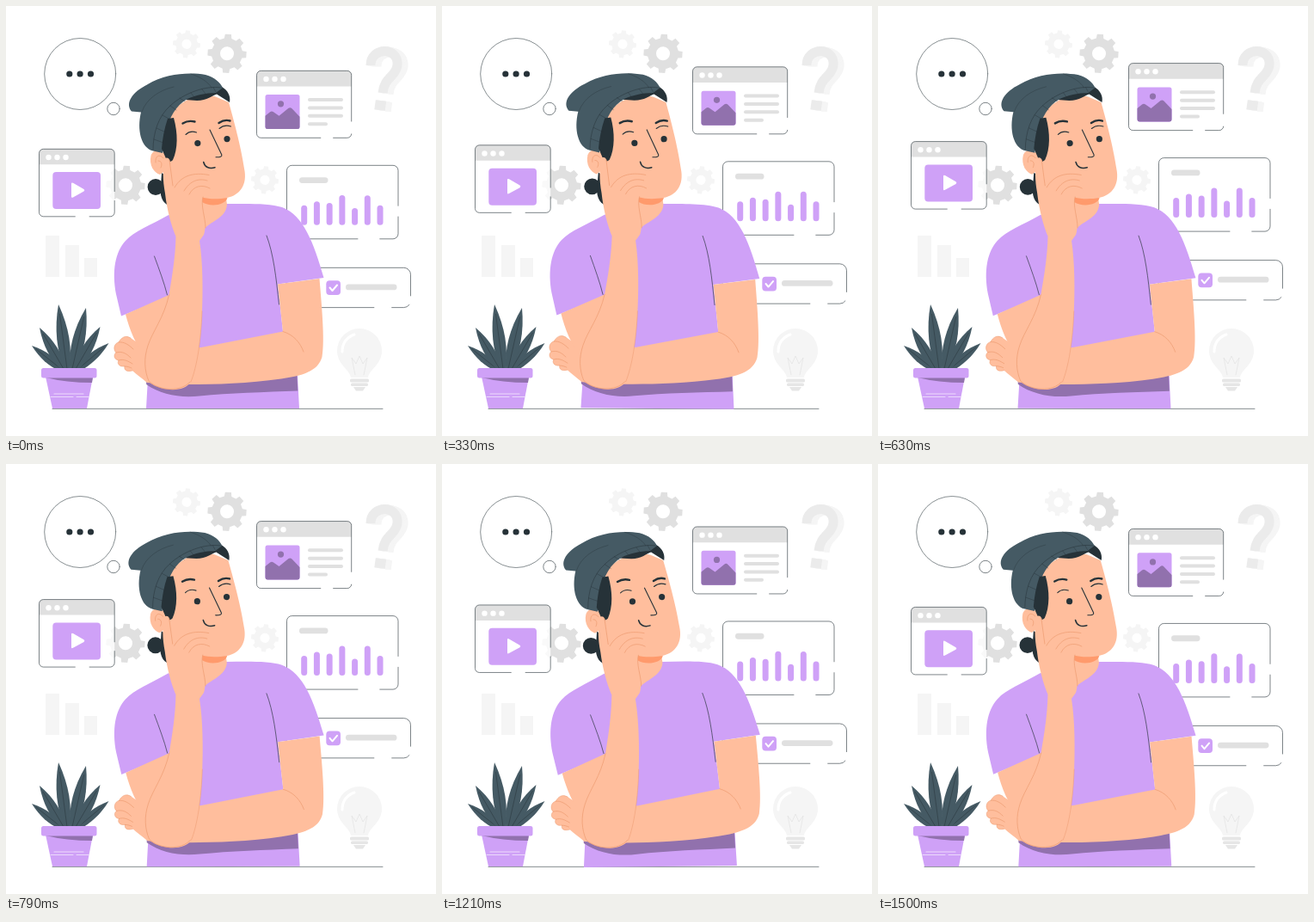
Recreate the animation shown at these times as an HTML page with a canvas. Size 500 by 500 pixels, loop 1.54 s.

```html
<!DOCTYPE html>
<html lang="en">
<head>
<meta charset="utf-8">
<title>Thinking</title>
<style>
html, body { margin: 0; width: 100%; height: 100%; overflow: hidden; background: #fff; }
canvas { display: block; width: 500px; height: 500px; }
</style>
</head>
<body>
<canvas id="stage" width="500" height="500"></canvas>
<script>
const ctx = document.getElementById('stage').getContext('2d');
const LOOP = 1540, TAU = Math.PI * 2;
const PURPLE = '#cfa1f7', SHADE = '#9171ad', INK = '#263238', HAT = '#455a64';
const SKIN = '#ffbe9d', CREASE = '#eb996e', GREY = '#e0e0e0', PALE = '#f5f5f5';

function fill(d, color) {
  ctx.fillStyle = color;
  ctx.fill(new Path2D(d));
}
function line(d, color, width = 0.65) {
  ctx.strokeStyle = color;
  ctx.lineWidth = width;
  ctx.stroke(new Path2D(d));
}
function dot(x, y, r, color) {
  ctx.fillStyle = color;
  ctx.beginPath();
  ctx.arc(x, y, r, 0, TAU);
  ctx.fill();
}
function ring(x, y, r, color, width) {
  ctx.strokeStyle = color;
  ctx.lineWidth = width;
  ctx.beginPath();
  ctx.arc(x, y, r, 0, TAU);
  ctx.stroke();
}
function box(x, y, w, h, r, color) {
  ctx.fillStyle = color;
  ctx.beginPath();
  ctx.roundRect(x, y, w, h, r);
  ctx.fill();
}

function gear(x, y, r, hole, color, turn) {
  ctx.save();
  ctx.translate(x, y);
  ctx.rotate(turn);
  ctx.fillStyle = color;
  ctx.beginPath();
  const tooth = TAU / 8;
  for (let i = 0; i < 8; i++) {
    for (const [part, k] of [[-.3, .79], [-.2, .99], [.2, .99], [.3, .79]]) {
      const a = (i + part) * tooth;
      ctx.lineTo(Math.cos(a) * r * k, Math.sin(a) * r * k);
    }
  }
  ctx.closePath();
  ctx.moveTo(hole, 0);
  ctx.arc(0, 0, hole, 0, TAU);
  ctx.fill('evenodd');
  ctx.restore();
}

function questionMark() {
  const hook = 'M424 69C424 47 457 47 455 69C453 83 440 82 438 101';
  const foot = 'M436 110L434.5 121';
  const layer = (color, dx, dy) => {
    ctx.save();
    ctx.translate(dx, dy);
    line(hook, color, 11);
    line(foot, color, 12.5);
    ctx.restore();
  };
  ctx.lineCap = 'butt';
  for (let i = 7; i > 0; i--) layer(PALE, i, i * .2);
  layer('#ebebeb', 0, 0);
  ctx.lineCap = 'round';
}

function bulb() {
  fill('M401 432C400 423 385 417 385 401A26 26 0 0 1 437 401C437 417 422 423 421 432Z', PALE);
  line('M391 402C391 391 397 385 405 382', '#fff', 3);
  line('M406 429L402 409L407 416L411 407L415 416L420 409L416 429', GREY, .6);
  box(400, 433.5, 22, 4, 1.5, '#e6e6e6');
  box(401, 438.5, 20, 3.5, 1.5, '#e6e6e6');
  fill('M404 443H418L415 447.5H407Z', '#e6e6e6');
}

function bubble() {
  ring(86.2, 79, 41.5, INK, .55);
  ring(125, 119.5, 7.2, INK, .6);
  for (const x of [73.8, 86.1, 98.5]) dot(x, 79, 3.6, INK);
}

function leaf(x, y, tipX, tipY, w) {
  const dx = tipX - x, dy = tipY - y, len = Math.hypot(dx, dy);
  const nx = -dy / len, ny = dx / len;
  const at = (t, side) => `${x + dx * t + nx * side} ${y + dy * t + ny * side}`;
  fill(`M${at(0, 3)}C${at(.3, w)} ${at(.62, w)} ${tipX} ${tipY}C${at(.62, -w)} ${at(.3, -w)} ${at(0, -3)}Z`, HAT);
  line(`M${x} ${y}L${at(.85, 0)}`, INK, .5);
}
function plant() {
  leaf(64, 422, 30, 395, 6);
  leaf(84, 422, 119.5, 392, 6);
  leaf(67, 422, 39, 374, 7.5);
  leaf(81, 422, 109.5, 373, 7.5);
  leaf(77, 422, 93, 351, 9);
  leaf(71, 422, 61, 347, 9);
  fill('M46 431H101L94 468H54Z', PURPLE);
  fill('M46 432H101L100 438Q70 438 46 432Z', SHADE);
  box(41, 421, 64.5, 11.5, 2.5, PURPLE);
  line('M56 451H90M52 454.5H78M82 454.5H96', '#fff', .6);
}

function frame(x, y, w, h, r, dashes, header) {
  box(x, y, w, h, r, 'rgba(255,255,255,.8)');
  if (header) {
    box(x, y, w, header, [r, r, 0, 0], GREY);
    for (let i = 0; i < 3; i++) dot(x + 11 + i * 10, y + 9.7, 3.2, '#fff');
  }
  ctx.strokeStyle = INK;
  ctx.lineWidth = .6;
  ctx.lineCap = 'butt';
  ctx.setLineDash(dashes);
  ctx.beginPath();
  ctx.roundRect(x, y, w, h, r);
  ctx.stroke();
  ctx.setLineDash([]);
  ctx.lineCap = 'round';
}

function panels() {
  // image window
  frame(291.5, 75.5, 110.2, 78, 5, [162, 14, 24, 14, 400, 0], 18.2);
  box(301.5, 103.3, 40, 40, 2.5, PURPLE);
  fill('M301.5 128L307 123.5Q309 122 311 123.5L317.5 128L328.5 119Q330.5 117.5 332.5 119.5L341.5 129V141Q341.5 143.3 339 143.3H304Q301.5 143.3 301.5 141Z', SHADE);
  dot(319.5, 114, 3.6, SHADE);
  [41, 41, 41, 23].forEach((w, i) => box(351, 107.2 + i * 9.4, w, 4, 2, GREY));

  // video window
  frame(38.5, 166.5, 87.7, 78.5, 5, [130, 10, 46, 16, 400, 0], 18);
  box(54.3, 193.3, 55.7, 43, 4, PURPLE);
  fill('M76 207Q76 204.8 78 206L90.5 213.2Q92.2 214.5 90.5 215.8L78 222.6Q76 223.8 76 221.8Z', '#fff');

  // bar chart
  frame(326.5, 185.5, 129.5, 85.5, 6, [168, 12, 45, 25, 500, 0]);
  box(341, 199.4, 33.5, 6.8, 3.4, GREY);
  [232, 227.5, 229.3, 220.3, 235.3, 220.5, 232].forEach((top, i) =>
    box(343.2 + i * 14.72, top, 7, 255 - top, 3.5, PURPLE));

  // check box
  frame(326, 304.5, 144.5, 46.3, 8, [166, 10, 22, 20, 400, 0]);
  box(372.3, 319.4, 16.7, 16.7, 4, PURPLE);
  line('M376.5 327.7L379.5 331.2L385 324.7', '#fff', 2);
  box(395, 323.7, 59.5, 6.8, 3.4, GREY);
}

function shirt() {
  fill('M189 243C168 255 149 262 139 273C127 286 123 308 128 335L134 360.5L170 346L163 468H341L339 430L322 378L316 323.5L369.5 316C358 276 346 243 321 234C306 229 280 230 256 230L230 256Z', PURPLE);
  fill('M163 432L338.5 429L339.3 447.5C300 449 260 450 225 453.5C203 456 180 452 163.2 440Z', SHADE);
  line('M172.5 291C178 306 184 322 187.5 336', INK);
  line('M303 267C311 288 314 315 317.5 347', INK);
}

function foldedArm() {
  fill('M316 323.5L364.5 317C367 348 371 388 367.5 408C363 425 344 430 320 433.5C282 439 244 440 212 440L164 438C157 432 151 428 147 424C140 426 137 423 138 419C131 420 129 415 131 412C125 411 125 405 128 403C124 399 126 392 131 391C134 386 139 382 145 386L165 400L227 397L322 378.5Z', SKIN);
  line('M322 378.5C334 382 342 391 346 402', CREASE);
  line('M131 391C137 390 143 394 148 399M128 403C135 401 140 404 145 409M131 412C137 410 142 413 147 416M138 419C141 419 144 420 146 421', CREASE);
  line('M145 386C138 382 134 386 131 391C126 392 124 399 128 403C125 405 125 411 131 412C129 415 131 420 138 419C137 423 140 426 147 424', CREASE, .5);
}

function head() {
  dot(174, 210.5, 9.4, INK);
  fill('M181 194C190 198 194 215 190 232C182 230 178 220 180 208Z', INK);
  fill('M183 185L188 232L197 266L231 259C235 252 256 247 257 231L255 216Z', SKIN);
  fill('M190 129C201 108 229 100 245 106L259 112C264 130 273 162 277 189C281 208 272 220 257 223C240 225 221 222 207 216L184 205L183 165Z', SKIN);
  fill('M228 222.5C237 225 248 224.5 257.5 223C255 232 237 234 228 228Z', '#ff9a6c');
  fill('M186 174C181 166 171 166 168.5 174C166 185 172 194 179 196L187 190Z', SKIN);
  line('M183 177C178 171 173 175 174 182M177 180C181 180 182 184 180 188', CREASE);

  fill('M208 109C222 99 240 92 251 94C258 98 261.5 105 260 112L245 102.5C240 104 234 110 222 110Z', INK);
  fill('M171 168.5C157 165 152 144 157 123.5L146 122.5C138 113 147 100 164 91.5C187 78 213 77 232 80C243 83 249 89 252 95L244 101C232 101 220 104 211 108C197 116 190 130 187 144C184 155 183 163 182 171Z', HAT);
  fill('M188 131L195 130C200 148 200 166 194 179C190 183 187 181 185 175L181 166C182 154 184 143 188 131Z', INK);
  line('M250 95C233 92 207 101 191 116C177 128 171 148 171 167', INK, .5);
  line('M158 123C163 108 178 98 195 94M215 79C225 82 235 88 239 95', INK, .35);
  line('M241 94.5L244 100M228 97L232 102M215 101L219 106M202 107L208 111M191 116L198 121M182 127L191 132M175 142L186 147M172 155L183 159', INK, .4);

  dot(222.8, 159.6, 3.6, INK);
  dot(257, 154.6, 3.6, INK);
  line('M205.5 136.5Q212 132.5 219.5 134.5M247.5 136Q254 131.5 260.5 133.5', INK, 2.4);
  line('M209 149.5Q214 144.5 221.5 147M248 142.5Q254 137.5 261.5 140', INK, 1.1);
  line('M237 144L250.8 173Q251.8 176 244 175.8', INK, 1.1);
  line('M229.7 181.5C231 187 236 190 243 187.8', INK, 1.5);
}

function raisedArm() {
  fill('M139 358.5L189.5 336C193 316 197 292 197.5 268C192 255 187 236 185 218C182 202 182 188 185 177C189 175 191 179 191 184L194 208C202 197 217 193 235 196C239 197 238 201 234 202C238 205 240 210 237 212C241 218 236 223 229 222C226 233 235 254 230 266L225 273C229 298 229 332 228 355C227 388 222 420 215 437C207 450 181 448 167 438C162 432 162 418 161 405C151 395 144 377 139 358.5Z', SKIN);
  line('M189.5 336C184 362 170 379 165 395C160 410 161 424 166 436C178 448 204 449 214 437', CREASE);
  line('M228 355C227 388 222 420 215 437', CREASE, .5);
  line('M190 179L194 209M196 211C204 197 218 193 236 196.5M207 215C214 203 224 200 234 203M213 219C218 209 228 207 237 212M229 222C226 232 232 246 232 258', CREASE);
}

function draw(now) {
  const t = now % LOOP;
  const wave = peak => Math.cos(TAU * (t - peak) / LOOP);
  ctx.clearRect(0, 0, 500, 500);
  ctx.lineCap = ctx.lineJoin = 'round';

  gear(210, 44.3, 16.3, 5.6, PALE, .1);
  gear(257, 55.3, 23, 8, GREY, .06);
  gear(139, 208.3, 23, 8, GREY, .06);
  gear(301, 202.3, 16.3, 5.6, PALE, .1);
  box(46, 267, 16, 48, 0, PALE);
  box(69, 278, 16, 37, 0, PALE);
  box(91, 293, 15, 22, 0, PALE);
  questionMark();
  bulb();
  bubble();

  ctx.save();
  ctx.translate(0, -4.6 - 4.55 * wave(712));
  panels();
  ctx.restore();

  line('M54 468.4H438', INK, .55);
  plant();

  ctx.save();
  ctx.translate(250, 284);
  ctx.rotate(.0098 * (wave(350) - .14));
  ctx.translate(-250, -284);
  shirt();
  foldedArm();
  head();
  raisedArm();
  ctx.restore();
}

const start = performance.now();
function tick() {
  draw(performance.now() - start);
  requestAnimationFrame(tick);
}
tick();
</script>
</body>
</html>
```
